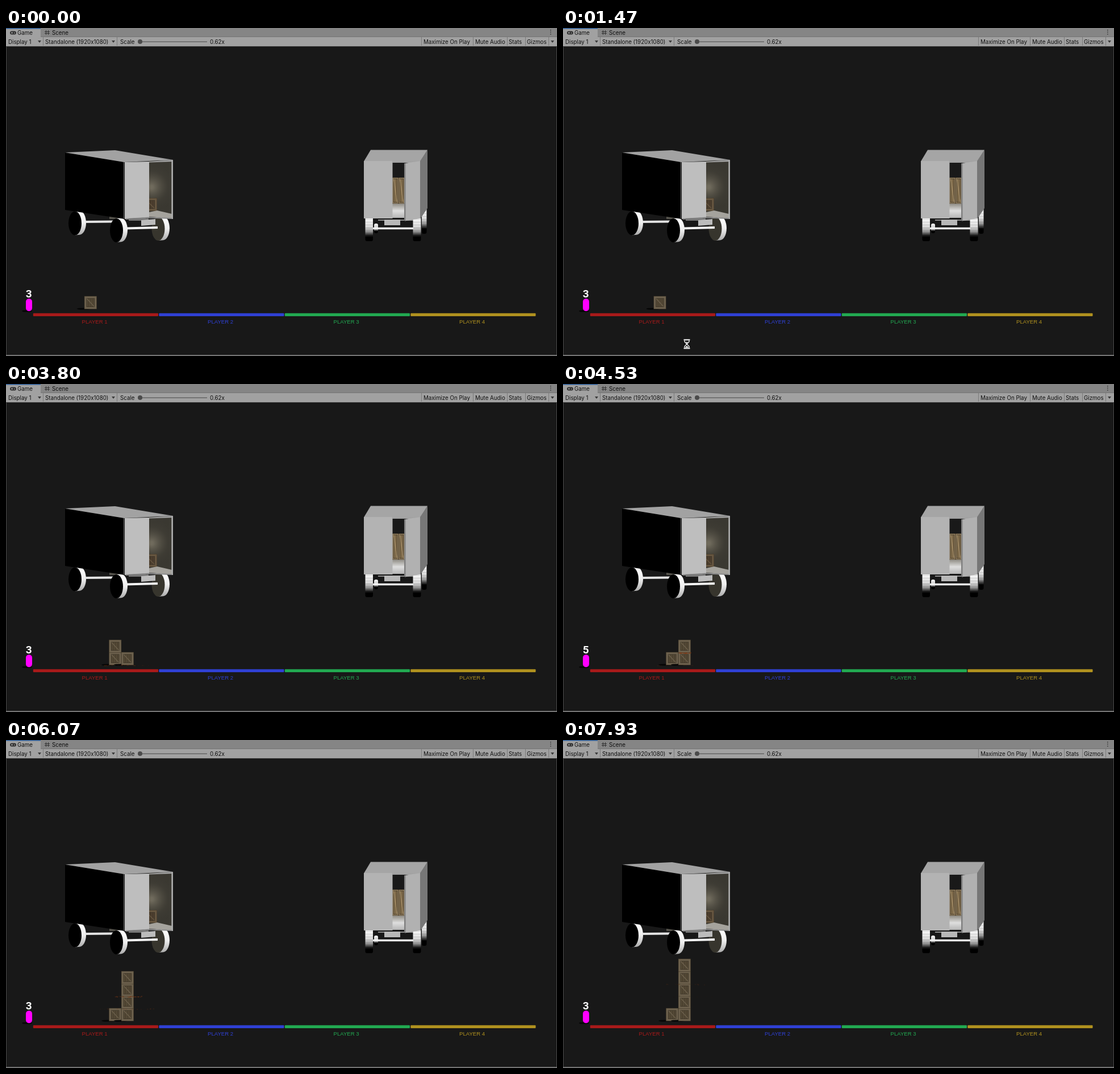
Animation, 970 px wide and 577 px high, one loop 8000 ms. Source, as an HTML page with a canvas:

```html
<!DOCTYPE html>
<html lang="en">
<head>
<meta charset="utf-8">
<title>Crate stacking</title>
<style>
html, body { margin: 0; width: 100%; height: 100%; overflow: hidden; background: #181818; }
canvas { display: block; }
</style>
</head>
<body>
<canvas id="stage" width="970" height="577"></canvas>
<script>
const stage = document.getElementById('stage');
const scene = document.createElement('canvas');
scene.width = stage.width;
scene.height = stage.height;
let g = scene.getContext('2d');

const LOOP = 8000, STEP = 70, GAP = 315, SETTLE = 120, FALL = 90;
const CELL = 21.7, COLS = 10;

// first and last step of each crate on its way to and fro
const RUNS = [[0, 26], [0, 7], [10, 33], [0, 13], [10, 13], [10, 33]];
const COUNT_KEYS = [[1470, 3], [2330, 1], [3800, 3], [4530, 5], [6070, 3]];

function bounce(n) {
  return COLS - Math.abs(COLS - n % (2 * COLS));
}

// Each crate travels level with the top of the stack and lands on its column.
function planCrates() {
  const heights = Array(COLS + 1).fill(0);
  let spawn = -310;
  return RUNS.map(([first, last]) => {
    const row = Math.max(...heights), rest = heights[bounce(last)]++;
    const stop = spawn + (last - first) * STEP;
    const land = stop + SETTLE + (row > rest ? FALL : 0);
    const crate = { spawn, first, last, row, rest, land };
    spawn = stop + GAP;
    return crate;
  });
}
const crates = planCrates();

function rect(x, y, w, h, fill) {
  g.fillStyle = fill;
  g.fillRect(x, y, w, h);
}

function pill(x, y, w, h, r, fill) {
  g.fillStyle = fill;
  g.beginPath();
  g.roundRect(x, y, w, h, r);
  g.fill();
}

function poly(fill, ...p) {
  g.fillStyle = fill;
  g.beginPath();
  for (let i = 0; i < p.length; i += 2) g.lineTo(p[i], p[i + 1]);
  g.closePath();
  g.fill();
}

function oval(x, y, rx, ry, fill) {
  g.fillStyle = fill;
  g.beginPath();
  g.ellipse(x, y, rx, ry, 0, 0, Math.PI * 2);
  g.fill();
}

function line(color, width, ...p) {
  g.strokeStyle = color;
  g.lineWidth = width;
  g.beginPath();
  for (let i = 0; i < p.length; i += 2) g.lineTo(p[i], p[i + 1]);
  g.stroke();
}

function text(s, x, y, font, fill, align = 'left') {
  g.font = font;
  g.fillStyle = fill;
  g.textAlign = align;
  g.fillText(s, x, y);
}

function fade(y0, y1, ...colors) {
  const f = g.createLinearGradient(0, y0, 0, y1);
  colors.forEach((c, i) => f.addColorStop(i / (colors.length - 1), c));
  return f;
}

function random(seed) {
  return () => (seed = (seed * 16807) % 2147483647) / 2147483647;
}

function box(x, y, w, h, light = '#6d614d', dark = '#544936') {
  rect(x, y, w, h, '#41382a');
  rect(x + 0.6, y + 0.6, w - 1.2, h - 1.2, light);
  const m = Math.min(w, h) * 0.17, iw = w - 2 * m, ih = h - 2 * m;
  rect(x + m, y + m, iw, ih, '#3a3226');
  rect(x + m + 0.8, y + m + 0.8, iw - 1.6, ih - 1.6, dark);
  for (let i = 1; i < 4; i++) rect(x + m + iw * i / 4, y + m + 1, 0.7, ih - 2, 'rgba(28,22,15,.35)');
  line(light, 1.4, x + m + 1, y + m + 1, x + w - m - 1, y + h - m - 1);
}

function arrow(x) {
  poly('#3a3a3a', x, 22, x + 6, 22, x + 3, 26);
}

function drawToolbar() {
  rect(0, 0, 970, 16, '#858585');
  rect(0, 0, 61, 16, '#a1a1a1');
  rect(0, 0, 61, 1.5, '#2c5f9e');
  rect(0, 15, 970, 17, '#a1a1a1');
  rect(61, 15, 909, 1, '#757575');
  rect(0, 32, 970, 1, '#3c3c3c');

  pill(7, 5.5, 11, 6, 3, '#333');
  rect(9, 8, 3, 1, '#a1a1a1');
  rect(10, 7, 1, 3, '#a1a1a1');
  rect(14, 8, 1.5, 1.5, '#a1a1a1');
  for (const d of [0, 4]) {
    rect(70 + d, 4, 1, 8, '#333');
    rect(68, 6 + d * 0.75, 9, 1, '#333');
  }

  const labels = { 'Display 1': 4, 'Standalone (1920x1080)': 69, 'Scale': 201, '0.62x': 359,
    'Maximize On Play': 735, 'Mute Audio': 826, 'Stats': 885, 'Gizmos': 917 };
  const font = '9.75px Inter, sans-serif', ink = '#101010';
  text('Game', 20, 12, font, ink);
  text('Scene', 81, 12, font, ink);
  for (const s in labels) text(s, labels[s], 27.5, font, ink);
  for (const x of [65, 195, 731, 822, 882, 914, 955]) rect(x, 16, 1, 15, '#7b7b7b');
  [56, 186, 959].forEach(arrow);
  rect(236, 23.5, 118, 1.5, '#646464');
  oval(236, 24, 4, 4, '#4a4a4a');
  for (let i = 0; i < 3; i++) rect(958, 3 + 3.5 * i, 1.5, 1.5, '#333');
}

// A thick disc seen at an angle: its face on the left, its tread to the right.
function disc(x, y, depth, face) {
  const rx = 11.5, ry = 21, tread = fade(y - ry, y + ry, '#fff', '#eee', '#aaa');
  oval(x + depth, y - 0.8, rx, ry, tread);
  poly(tread, x, y - ry, x + depth, y - ry - 0.8, x + depth, y + ry - 0.8, x, y + ry);
  oval(x, y, rx, ry, face);
}

function drawLeftTruck() {
  rect(182, 331, 30, 5, '#55534c');
  disc(121.5, 343.5, 8, '#000');
  line('#e2e2e2', 4, 140, 341, 190, 340.5);
  disc(268, 353, 8.5, '#37352d');
  line('#f4f4f4', 4, 210, 352.5, 267, 351);
  disc(194.5, 356, 8, '#000');

  poly('#000', 104, 219, 209, 236, 209, 336, 104, 320);
  poly('#a2a2a2', 104, 219, 192, 215, 294, 232, 208, 236);
  const glow = g.createRadialGradient(256, 280, 3, 258, 278, 52);
  glow.addColorStop(0, '#6f6a5c');
  glow.addColorStop(0.5, '#55514629');
  glow.addColorStop(1, '#2a292400');
  poly('#3a3831', 252, 234, 292, 233, 292, 330, 252, 326);
  poly(glow, 252, 237, 291, 235, 291, 326, 252, 324);
  box(243, 299, 23, 23, '#665640', '#4e4030');
  poly('#a5a39d', 252, 324, 266, 321, 292, 327, 292, 335, 252, 332);
  poly('#bebebe', 209, 236, 252, 235, 252, 333, 209, 336);
  line('#9a9a9a', 0.8, 207.5, 236, 207.5, 335);
  poly('#a4a4a4', 252, 235, 294, 232, 294, 235, 252, 236.5);
  rect(291.3, 232, 2.7, 104, '#ababab');
  line('#8a8a8a', 2, 211, 336, 252, 333.5, 292, 335);
  rect(216, 335, 35, 4, '#777');
  poly('#bcbcbc', 238, 338, 263, 336, 263, 346, 238, 348);
}

function wheel(x, y, w, h) {
  pill(x, y, w, h, 3, fade(y, y + h, '#fff', '#eee', '#ddd', '#999', '#000', '#000'));
  for (let d = 4; d < h - 8; d += 5) rect(x, y + d, w, 0.7, 'rgba(90,90,90,.3)');
}

function drawRightTruck() {
  wheel(648, 344, 7, 17);
  wheel(732, 317, 8.5, 45);
  rect(655, 337, 64, 2, '#8c8c8c');
  wheel(632.5, 332, 13.5, 43);
  wheel(716.5, 332, 14, 43);
  line('#f0f0f0', 3.5, 646, 352.5, 717, 352.5);

  poly('#a5a5a5', 642, 214.5, 742, 214.5, 730, 234.5, 630, 234.5);
  poly('#777', 742, 214.5, 742, 317, 729, 336, 729, 234);
  rect(680, 235, 24, 100, '#191919');
  for (const x of [680, 691]) box(x, 263, 11, 46, '#a08a66', '#8d7753');
  rect(680, 309, 23, 25, fade(309, 334, '#8f8c84', '#dedede', '#b5b5b5'));
  rect(630, 234, 50.5, 101, '#b3b3b3');
  rect(680, 234, 49, 3, '#a2a2a2');
  poly('#b1b1b1', 702, 238, 729, 234, 729, 335, 702, 339.5);
  rect(701, 238, 2.5, 101, '#808080');
  rect(666, 337, 28, 10, '#b8b8b8');
}

function drawScene() {
  rect(0, 0, 970, 577, '#181818');
  drawToolbar();
  drawLeftTruck();
  drawRightTruck();
  ['#a81a1a', '#2f40d4', '#22a951', '#b0911f'].forEach((color, i) => {
    const x = 47.8 + i * 221.5;
    pill(x, 501.7, 220.2, 5.3, 1, color);
    text('PLAYER ' + (i + 1), x + 108.3, 520, '9.6px "Liberation Sans", sans-serif', color, 'center');
  });
  oval(37, 498, 9, 1.6, '#050505');
  pill(35, 476, 11, 22, 5.5, '#f0f');
  rect(0, 33, 1, 544, '#4a4a4a');
  rect(969, 33, 1, 544, '#4a4a4a');
  rect(0, 575, 970, 2, '#757575');
}

function left(col) {
  return 137.8 + (col - 4) * CELL;
}

function drawCrate({ spawn, first, last, row, rest, land }, t) {
  const col = bounce(Math.min(last, first + Math.floor((t - spawn) / STEP)));
  const fall = Math.min(1, Math.max(0, 1 + (t - land) / FALL));
  const level = row + (rest - row) * fall * fall;
  const x = left(col);
  if (level === 0) oval(x - 1, 494, 12, 1.6, '#060606');
  box(x, 471.6 - level * CELL, 22, 23);
}

function drawDust({ last, rest, land }, t) {
  const age = (t - land) / 1000;
  if (age < 0 || age > 2.8) return;
  const next = random(911 + land);
  const x = left(bounce(last)) + 11, y = 495.5 - rest * CELL;
  const spread = 56 * (1 - Math.exp(-age * 1.2));
  for (let n = 0; n < 46; n++) {
    const side = next() * 2 - 1, size = 0.6 + next(), lift = next() * 1.6;
    const life = 1 - age / (1.2 + next() * 1.6);
    if (life > 0) rect(x + side * spread, y - lift, size * 1.6, size * 0.8, `rgba(126,58,22,${0.7 * life})`);
  }
}

function count(t) {
  const i = COUNT_KEYS.findIndex(k => k[0] > t);
  if (i < 1) return 3;
  const [t0, a] = COUNT_KEYS[i - 1], [t1, b] = COUNT_KEYS[i];
  return Math.round(a + (b - a) * (t - t0) / (t1 - t0));
}

function drawHourglass(t) {
  if (t < 1200 || t > 1720) return;
  const rise = Math.min(1, (t - 1200) / 200);
  g.save();
  g.translate(218, 576 - 20 * rise);
  rect(-6, -9, 12, 18, '#111');
  for (const s of [-1, 1]) {
    rect(-5.5, s * 7.5 - 1, 11, 2, '#fff');
    line('#fff', 1.3, -4 * s, -6.5, -4 * s, -4, 0, 0, 4 * s, 4, 4 * s, 6.5);
  }
  poly('#fff', -2, -3.4, 2, -3.4, 0, -1);
  poly('#fff', -3, 6, 3, 6, 0, 3);
  g.restore();
}

function draw(t) {
  g.drawImage(scene, 0, 0);
  const active = crates.filter(c => t >= c.spawn);
  active.forEach(c => drawCrate(c, t));
  active.forEach(c => drawDust(c, t));
  text(count(t), 40.3, 474, 'bold extra-condensed 19px Roboto, sans-serif', '#fff', 'center');
  drawHourglass(t);
}

drawScene();
g = stage.getContext('2d');
const start = performance.now();
function tick() {
  draw((performance.now() - start) % LOOP);
  requestAnimationFrame(tick);
}
tick();
</script>
</body>
</html>
```
